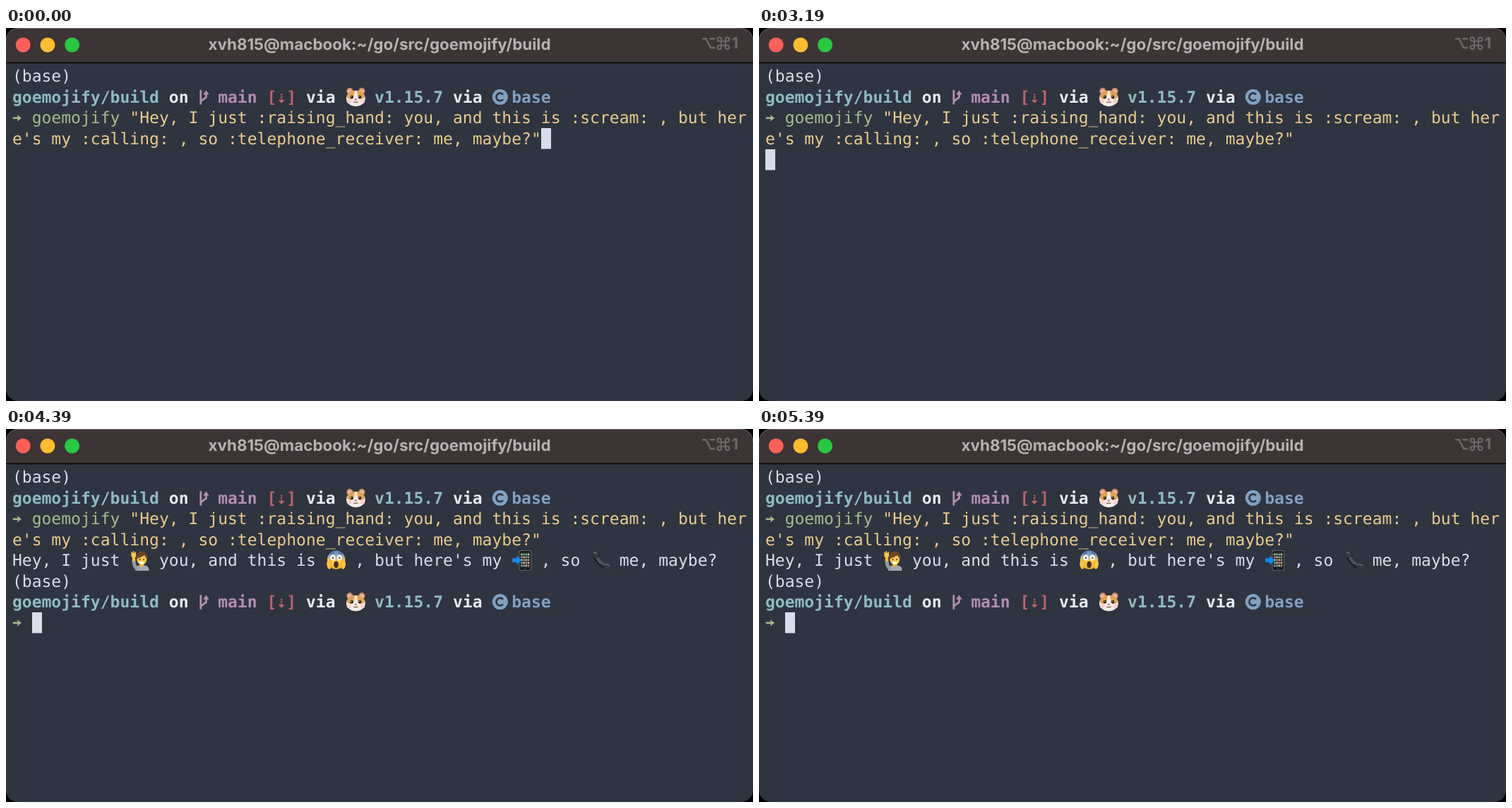
These frames come from a looping animation (1058x529 px, 5.99 s). An HTML page with a canvas:

```html
<!DOCTYPE html>
<html lang="en">
<head>
<meta charset="utf-8">
<title>Terminal</title>
<style>
html, body { margin: 0; width: 100%; height: 100%; overflow: hidden; background: #000; }
canvas { display: block; }
</style>
</head>
<body>
<canvas id="stage" width="1058" height="529"></canvas>
<script>
const ctx = document.getElementById('stage').getContext('2d');
const W = 1058, H = 529, LOOP = 5990;
const LEFT = 8.9, TOP = 54, CELL = 13.868, ROW = 29.45;
const MONO = '"DejaVu Sans Mono", monospace';
const C = {
  bg: '#2e3440', bar: '#3c3435', fg: '#d8dee9', white: '#e9edf3', teal: '#8fbcbb',
  purple: '#b48ead', red: '#bf616a', blue: '#81a1c1', green: '#a3be8c', yellow: '#ebcb8b'
};
const T = { enter: 3190, output: 3390, busy: 3990, prompt: 4390 };

const colX = col => LEFT + col * CELL;
const rowY = row => TOP + row * ROW;

function write(row, col, text, color, weight = 'normal') {
  ctx.font = `${weight} 23px ${MONO}`;
  ctx.fillStyle = color;
  [...text].forEach((ch, i) => {
    if (ch !== ' ') ctx.fillText(ch, colX(col + i), rowY(row) + 22.4);
  });
}

function disc(x, y, rx, color, ry = rx, turn = 0) {
  ctx.fillStyle = color;
  ctx.beginPath();
  ctx.ellipse(x, y, rx, ry, turn, 0, Math.PI * 2);
  ctx.fill();
}

function box(x, y, w, h, r, color) {
  ctx.fillStyle = color;
  ctx.beginPath();
  ctx.roundRect(x, y, w, h, r);
  ctx.fill();
}

function shape(d, color) {
  ctx.fillStyle = color;
  ctx.fill(new Path2D(d));
}

function line(d, color, width, cap = 'butt') {
  ctx.strokeStyle = color;
  ctx.lineWidth = width;
  ctx.lineCap = cap;
  ctx.lineJoin = cap === 'round' ? 'round' : 'miter';
  ctx.stroke(new Path2D(d));
}

function at(x, y, draw) {
  ctx.save();
  ctx.translate(x, y);
  draw();
  ctx.restore();
}

function hamster() {
  for (const x of [5.5, 22.5]) {
    disc(x, 5.5, 4.6, '#c98f6b');
    disc(x, 6, 2.9, '#efb3ab');
  }
  disc(14, 16, 13.4, '#f4ede8', 11.2);
  shape('M12.5 5 C8 4 2 7 1.5 14 C4 17.5 9 18 11 14 Z', '#e3a04f');
  shape('M15.5 5 C20 4 26 7 26.5 14 C24 17.5 19 18 17 14 Z', '#e3a04f');
  disc(4.5, 20, 3.2, '#f3d3cc', 2.6);
  disc(23.5, 20, 3.2, '#f3d3cc', 2.6);
  for (const x of [8.4, 19.6]) {
    disc(x, 14, 2.1, '#2b1d1a', 2.4);
    disc(x - 0.6, 13.2, 0.6, '#fff');
  }
  disc(14, 17.6, 1.9, '#e0787c', 1.3);
  line('M11 21 Q12.7 22.6 14 20.6 Q15.3 22.6 17 21', '#8b6259', 1.1, 'round');
}

function raisedHand() {
  shape('M7 29 V26 Q8 21 15 21 Q25 21 26 26 V29 Z', '#a4abb0');
  line('M9 26 Q4.5 22 4.7 14', '#949ca2', 5, 'round');
  line('M4.6 14 V9', '#f5bd35', 4, 'round');
  disc(4.5, 7, 3.4, '#fccb46', 3.7);
  line('M2.3 6 L1.6 3 M4.2 5 V1.8 M6.3 6 L7.2 3', '#fccb46', 1.6, 'round');
  disc(16, 10.4, 8.4, '#6d4529', 8.9);
  box(13, 18, 6, 5.5, 2.5, '#edaf2e');
  disc(16, 13, 6.8, '#fccb46', 7.8);
  shape('M8.8 12 Q8 3.5 16 3 Q24 3.5 23.2 12 Q21 10 20 7 Q15 10 8.8 12 Z', '#6d4529');
  disc(13.3, 13, 0.95, '#402d23', 1.2);
  disc(18.8, 13, 0.95, '#402d23', 1.2);
  shape('M12.5 16.4 H19.5 Q18.7 19.6 16 19.6 Q13.3 19.6 12.5 16.4', '#fff');
}

function scream() {
  const skin = ctx.createLinearGradient(0, 0, 0, 27);
  skin.addColorStop(0, '#5f83cf');
  skin.addColorStop(0.3, '#8fa8bd');
  skin.addColorStop(0.52, '#f6cd50');
  skin.addColorStop(1, '#f2ae2c');
  disc(14, 13.5, 12.7, skin, 13.2);
  for (const x of [9.3, 18.7]) {
    disc(x, 10.4, 3.6, '#fff', 4);
    disc(x, 10.7, 1.2, '#43302a');
  }
  line('M6 5.5 Q8 3.3 10.5 3.7 M22 5.5 Q20 3.3 17.5 3.7', '#384d79', 1.1, 'round');
  disc(14, 20.2, 3.2, '#4b2b22', 4.7);
  for (const side of [-1, 1]) at(14, 0, () => {
    ctx.scale(side, 1);
    disc(10.2, 21, 3, '#e99a22', 6, 0.2);
    disc(10.5, 20.4, 2.5, '#fac744', 5.6, 0.2);
    line('M8 18 L6.7 14.7 M10 16 L8.8 12.8', '#f5b936', 1.8, 'round');
  });
}

function calling() {
  box(9.4, 0.2, 17.6, 28.3, 2.8, '#7c7f81');
  box(10.2, 0.8, 16, 27.1, 2.3, '#17191b');
  box(11.3, 3.5, 13.8, 21, 0.5, '#31383b');
  const apps = ['#d9c663', '#7bb36b', '#cf7d62', '#78a3bc', '#cfd0c8'];
  for (let r = 0; r < 5; r++)
    for (let c = 0; c < 4; c++)
      box(12.1 + c * 3.2, 4.3 + r * 4, 2.2, 2.5, 0.5, apps[(r * 2 + c * 3) % 5]);
  disc(18.2, 26.2, 0.9, '#626668');
  shape('M0 11.2 H6 V7.4 L13.3 14 L6 20.6 V16.8 H0 Z', '#1688ec');
}

function receiver() {
  line('M6.5 5 C8 13 14 20 23 22.8', '#171a1c', 7.6, 'round');
  line('M6.8 4.5 C8.5 12.5 15 19 23 22.2', '#4c5359', 4.7, 'round');
  disc(6.6, 6, 3.8, '#343a3f', 5.8, -0.45);
  disc(22.8, 22.7, 5.8, '#343a3f', 3.8, 0.45);
  line('M4.2 3.8 Q7 1.2 9 5 M19.6 20.2 Q24 18.8 27 22', '#70777c', 1.1, 'round');
}

function titleBar(busy) {
  ctx.fillStyle = C.bar;
  ctx.fillRect(0, 0, W, 49);
  ctx.fillStyle = '#000';
  ctx.fillRect(0, 48.6, W, 1.4);
  ['#ff5f57', '#febc2e', '#28c840'].forEach((color, i) => disc(24.2 + i * 34.7, 24, 10.5, color));
  if (busy) disc(24.2, 24, 3.4, '#7d120d');

  ctx.font = 'bold 22.4px Inter, sans-serif';
  ctx.fillStyle = '#b8b1b1';
  ctx.textAlign = 'center';
  ctx.fillText('xvh815@macbook:~/go/src/goemojify/build', 529, 31);
  ctx.textAlign = 'left';

  const dim = '#6e6767';
  line('M986 15.2 H991.5 L998 28 H1004 M996.5 15.2 H1004', dim, 2.5);
  // command key: four loops around a square
  for (const sx of [-1, 1]) for (const sy of [-1, 1]) at(1016, 21.7, () => {
    ctx.scale(sx, sy);
    line('M0 3 H6 A2.7 2.7 0 1 1 3 6 V0', dim, 2.1);
  });
  ctx.font = 'bold 22px Inter, sans-serif';
  ctx.fillStyle = dim;
  ctx.fillText('1', 1027.7, 29.4);
}

function arrow(row) {
  at(LEFT, rowY(row) + 14.8, () => {
    line('M0.8 0 H9', C.green, 2.5);
    shape('M6.8 -4.8 L13 0 L6.8 4.8 L8.2 0 Z', C.green);
  });
}

function prompt(row) {
  write(row, 0, '(base)', C.fg);
  const r = row + 1;
  const bold = (col, text, color) => write(r, col, text, color, 'bold');
  bold(0, 'goemojify/build', C.teal);
  bold(16, 'on', C.white);
  bold(21, 'main', C.purple);
  bold(26, '[⇣]', C.red);
  bold(30, 'via', C.white);
  bold(37, 'v1.15.7', C.teal);
  bold(45, 'via', C.white);
  bold(51, 'base', C.blue);
  at(colX(19), rowY(r), () => {
    line('M3.4 4.5 V25 M3.4 20.5 L11 15 V9', C.purple, 2.8);
    shape('M6.7 11 L11 4.8 L15.3 11 Z', C.purple);
  });
  at(colX(34) + 1, rowY(r) + 0.5, hamster);
  at(699.8, rowY(r) + 14.4, () => {
    disc(0, 0, 11, C.blue);
    line('M4.2 -3.4 A5.4 5.4 0 1 0 4.2 3.4', C.bg, 2.7);
  });
  arrow(row + 2);
}

function output(row) {
  const parts = [[0, 'Hey, I just'], [15, 'you, and this is'], [35, ", but here's my"],
    [54, ', so'], [62, 'me, maybe?']];
  parts.forEach(([col, text]) => write(row, col, text, C.fg));
  const icons = [[12, raisedHand], [32, scream], [51, calling], [59, receiver]];
  icons.forEach(([col, draw]) => at(colX(col) + 1, rowY(row) + 0.3, draw));
}

function cursor(row, col) {
  ctx.fillStyle = C.fg;
  ctx.fillRect(Math.round(colX(col)), Math.round(rowY(row)), 14, 29.5);
}

function draw(t) {
  ctx.fillStyle = '#000';
  ctx.fillRect(0, 0, W, H);
  ctx.save();
  ctx.beginPath();
  ctx.roundRect(0, 0, W, H, 17);
  ctx.clip();
  ctx.fillStyle = C.bg;
  ctx.fillRect(0, 0, W, H);
  titleBar(t >= T.busy && t < T.prompt);
  line('M0 18 A17.5 17.5 0 0 1 17.5 0.5 H1040.5 A17.5 17.5 0 0 1 1058 18', '#655d5e', 1);

  prompt(0);
  write(2, 2, 'goemojify', C.green);
  write(2, 12, '"Hey, I just :raising_hand: you, and this is :scream: , but her', C.yellow);
  write(3, 0, 'e\'s my :calling: , so :telephone_receiver: me, maybe?"', C.yellow);
  if (t >= T.output) output(4);
  if (t >= T.prompt) prompt(5);

  if (t < T.enter) cursor(3, 54);
  else if (t < T.output) cursor(4, 0);
  else if (t < T.prompt) cursor(5, 0);
  else cursor(7, 2);
  ctx.restore();
}

ctx.textRendering = 'geometricPrecision';
function tick() {
  draw(performance.now() % LOOP);
  requestAnimationFrame(tick);
}
tick();
</script>
</body>
</html>
```
